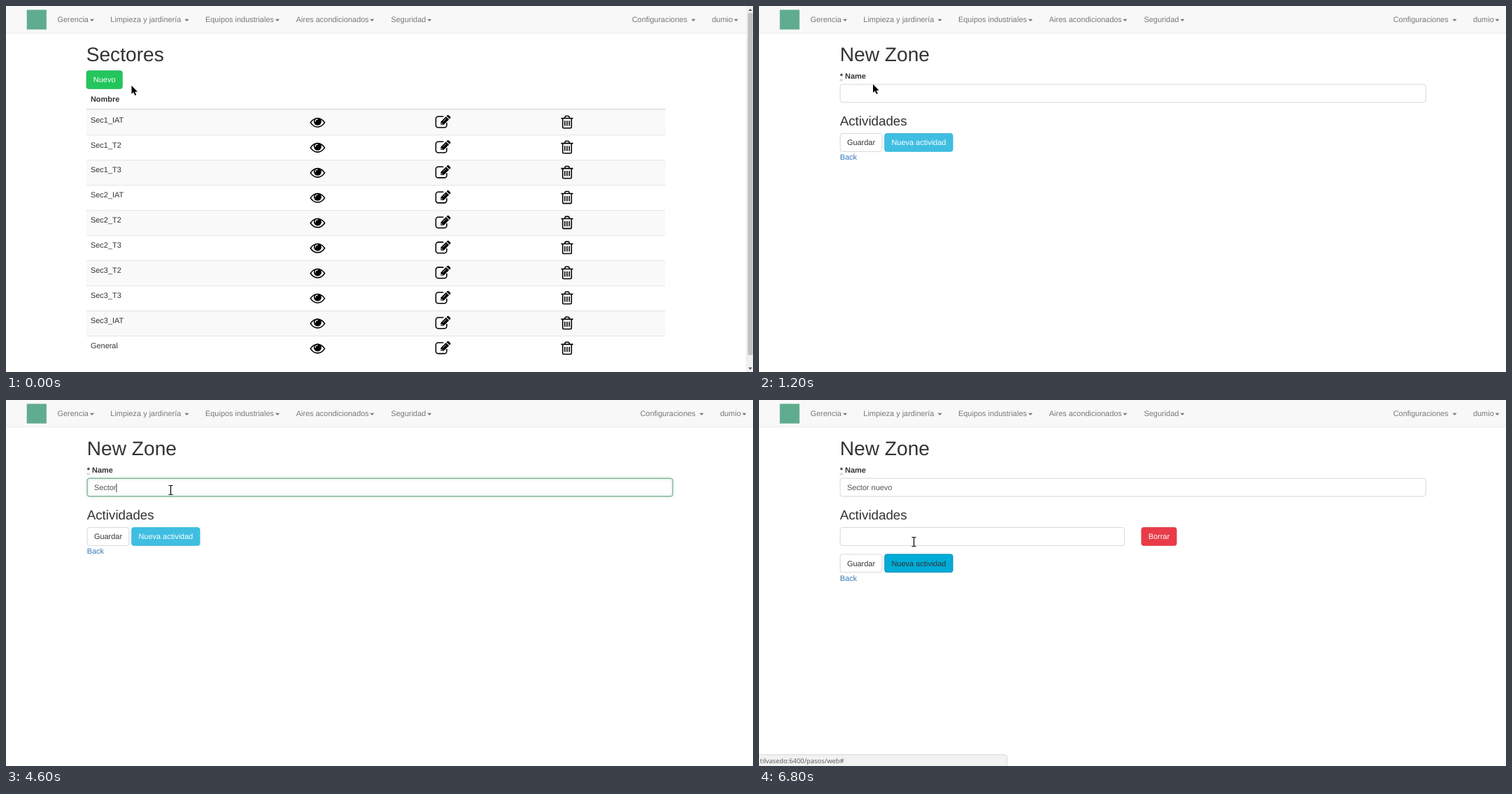
These frames come from a looping animation (1068x524 px, 8000 ms). An HTML page:

```html
<!DOCTYPE html>
<html lang="es">
<head>
<meta charset="utf-8">
<title>Sectores</title>
<style>
  html, body { margin: 0; width: 100%; height: 100%; overflow: hidden; background: #fff; }
  svg { display: block; width: 1068px; height: 524px; }
  text { font: 14px "Liberation Sans", Arial, sans-serif; fill: #333; text-rendering: geometricPrecision; white-space: pre; }
  .h1 { font-size: 36px; }
  .h3 { font-size: 24px; }
  .bold { font-weight: bold; }
  .nav text { fill: #777; }
  .nav path { fill: #777; }
  .light { fill: #fff; }
  .link { fill: #337ab7; }
  .typed { fill: #555; }
  .status text { font: 12px "Open Sans", "Noto Sans", sans-serif; fill: #555; }
  .green rect { fill: #22c65d; stroke: #1eb454; }
  .cyan rect { fill: #3fbee2; stroke: #30b5dc; }
  .red rect { fill: #e83c48; stroke: #e02d3a; }
  .plain rect { fill: #fff; stroke: #ccc; }
  .green text, .cyan text, .red text { fill: #fff; }
  .hover text { fill: #333; }
  .green.hover rect { fill: #04ad49; stroke: #078a3c; }
  .cyan.hover rect { fill: #00acd8; stroke: #0783a6; }
  #focus { fill: none; stroke: #4a9c6c; filter: drop-shadow(0 0 3px rgba(70, 165, 105, .7)); }
  #cursor path { fill: #000; stroke: #fff; stroke-width: .8; paint-order: stroke; }
</style>
</head>
<body>
<svg id="stage" viewBox="0 0 1366 670.2" preserveAspectRatio="none"></svg>
<script>
const stage = document.getElementById('stage');
const byId = id => document.getElementById(id);

// Layout is in 1366-wide page units; the cursor layer is in stage pixels.
const text = (x, y, s, cls = '') => `<text x="${x}" y="${y}" class="${cls}">${s}</text>`;
const box = (x, y, w, h, fill, more = '') =>
  `<rect x="${x}" y="${y}" width="${w}" height="${h}" fill="${fill}" ${more}/>`;
const framed = (x, y, w, h, more = '') =>
  box(x + .5, y + .5, w - 1, h - 1, '#fff', `rx="4" ${more}`);
const button = (x, y, w, label, cls, id = '') =>
  `<g class="${cls}" id="${id}">${framed(x, y, w, 34)}${text(x + 13, y + 22, label)}</g>`;
const menu = ([label, x, caret]) =>
  text(x, 30, label) + `<path d="M${caret} 24h8l-4 4z"/>`;

const navLeft = [
  ['Gerencia', 94, 153.3], ['Limpieza y jardinería', 191, 326.7],
  ['Equipos industriales', 364.5, 492.4], ['Aires acondicionados', 530.5, 665.4],
  ['Seguridad', 704, 770.2]
];
const navRight = [['Configuraciones', 1144.7, 1253], ['dumio', 1290.8, 1331]];

const nav = `<g class="nav">
  ${box(0, 0, 1366, 49, '#f8f8f8')}${box(0, 49, 1366, 1, '#e7e7e7')}
  ${box(38, 7, 36, 36, '#5fac8e')}
  ${navLeft.map(menu).join('')}
  <g id="navRight">${navRight.map(menu).join('')}</g></g>`;

const icons = `<defs><g id="icons">
  <g fill="none" stroke="#000" stroke-width="2">
    <path d="M556.8 23.5c3.6-5.4 8-8 13-8s9.400 2.600 13 8c-3.600 5.400-8 8-13 8s-9.400-2.600-13-8z"/>
    <path d="M800 12.500h-9.500a4.500 4.500 0 0 0-4.500 4.500v11a4.500 4.500 0 0 0 4.500 4.500h11a4.500 4.500 0 0 0 4.500-4.500v-4"/>
    <path d="M1015 15.500h22M1021.500 15l1-2.500q.4-1 1.500-1h4q1.100 0 1.500 1l1 2.500M1018 15v17q0 1.500 1.500 1.500h13q1.500 0 1.500-1.500v-17M1022 20v9.500M1026 20v9.500M1030 20v9.500"/>
  </g>
  <circle cx="569.8" cy="21.5" r="7"/>
  <path d="M565.6 21.500a4.200 4.200 0 0 1 4.200-4.200" fill="none" stroke="#fff" stroke-width="1.500" stroke-linecap="round"/>
  <path d="M795 27.500v-5.500l9.600-9.600 5.500 5.500-9.600 9.600zM805.600 11.400l1.200-1.200q1.500-1.500 3 0l2.500 2.500q1.500 1.500 0 3l-1.200 1.200z"/>
  <path d="M799 21.800l6-6M796.600 24v2h2" fill="none" stroke="#fff" stroke-width=".9"/>
</g></defs>`;

const names = ['Sec1_IAT', 'Sec1_T2', 'Sec1_T3', 'Sec2_IAT', 'Sec2_T2',
  'Sec2_T3', 'Sec3_T2', 'Sec3_T3', 'Sec3_IAT', 'General'];
const row = (name, i) => {
  const y = 190 + 46 * i;
  return (i % 2 ? '' : box(146.7, y, 1059, 46, '#f9f9f9'))
    + (i ? box(146.7, y, 1059, 1, '#ddd') : '')
    + text(154.7, y + 23, name) + `<use href="#icons" y="${y}"/>`;
};

const scrollbar = box(1353, 0, 13, 671, '#f0f0f0') + box(1356.5, 13, 9, 626, '#c1c1c1')
  + '<path d="M1357.500 9l3.500-4 3.500 4zM1357.500 662l3.500 4 3.500-4z" fill="#505050"/>';

const listPage = `<g id="listPage">
  ${text(146.7, 101.5, 'Sectores', 'h1')}
  ${button(146.7, 118, 66.5, 'Nuevo', 'green', 'create')}
  ${text(154.7, 175, 'Nombre', 'bold')}
  ${names.map(row).join('')}${box(146.7, 188, 1059, 2, '#ddd')}
  ${scrollbar}</g>`;

const formPage = `<g id="formPage">
  ${text(148, 101.5, 'New Zone', 'h1')}${text(148, 133, '* Name', 'bold')}
  <path d="M148 134.500h6M148 136.500h6" stroke="#777" stroke-dasharray="1"/>
  ${framed(148, 143, 1071.7, 34, 'stroke="#ccc"')}
  ${framed(148, 143, 1071.7, 34, 'id="focus"')}
  <text id="typed" class="typed" x="161" y="165"></text>
  ${box(0, 153, 1.2, 16, '#333', 'id="caret"')}
  ${text(148, 218.5, 'Actividades', 'h3')}
  <g id="activity">${framed(148, 233, 520.7, 34, 'stroke="#ccc"')}
    ${button(699, 233, 65, 'Borrar', 'red')}</g>
  <g id="actions">${button(148, 233, 77.4, 'Guardar', 'plain')}
    ${button(229.3, 233, 125.6, 'Nueva actividad', 'cyan', 'add')}
    ${text(148, 282, 'Back', 'link')}</g></g>`;

const status = `<g id="status" class="status">
  <path d="M-1 649.500h450q4.500 0 4.500 4.500v18h-455z" fill="#f2f2f2" stroke="#ccc"/>
  <text id="address" x="2" y="665.5"></text></g>`;

stage.innerHTML = icons + nav + listPage + formPage + status
  + '<g transform="scale(1.279)"><g id="cursor"><path/></g></g>';

const shapes = {
  arrow: 'M0 0v12l2.800-2.500 2 4.600 2-.9-2-4.400h3.700z',
  hand: 'M-1.200 1Q0-.6 1.200 1V5q1.500-.8 2.300.4 1.600-.6 2.200.6 1.900-.3 2 1.400V11q0 1.500-1 3v.8H-.5V14Q-3.500 10-4.200 8q0-1.600 1.400-1.200L-1.200 8z',
  beam: 'M-3-7h2.300l.7.500.7-.5H3v1H.6V6H3v1H.7L0 6.500-.7 7H-3V6h2.400V-6H-3z'
};
const moves = [
  [0, 'arrow', 179.5, 114], [200, 'arrow', 172, 112], [300, 'hand', 157.5, 109],
  [1200, 'arrow', 163, 112], [1300, 'arrow', 178, 117], [1400, 'beam', 195, 124],
  [1500, 'beam', 212, 131], [1600, 'beam', 224, 135], [1700, 'beam', 231.5, 137],
  [2000, 'beam', 235.5, 129], [6300, 'hand', 222, 187], [6800, 'beam', 221.5, 203]
];
const typing = [[0, ''], [4600, 'Sector'], [5000, 'Sector n'], [5400, 'Sector nuevo']];

const at = (keys, t) => keys.filter(k => k[0] <= t).pop();
const show = (id, on) => byId(id).setAttribute('opacity', +on);
const shift = (id, x, y) => byId(id).setAttribute('transform', `translate(${x} ${y})`);
// Fades advance in three 100 ms steps.
const fade = (t, start) => Math.max(0, Math.min(1, (Math.floor((t - start) / 100) + 1) / 3));

function render(t) {
  const onForm = t >= 1200, added = t >= 6800;
  show('listPage', !onForm);
  show('formPage', onForm);
  shift('navRight', onForm ? 15 : 0, 0);
  byId('create').classList.toggle('hover', t >= 300);
  byId('add').classList.toggle('hover', t >= 6300);

  const value = byId('typed');
  value.textContent = at(typing, t)[1];
  byId('caret').setAttribute('x', 161 + value.getComputedTextLength());
  show('caret', t >= 2200 && t < 6300);
  show('focus', added ? 0 : fade(t, 2200));
  show('activity', added);
  shift('actions', 0, added ? 49 : 0);

  show('status', added ? 1 : onForm ? 0 : fade(t, 500));
  byId('address').textContent = 'tilvasedo:6400/pasos/web' + (added ? '#' : '');

  const [, shape, x, y] = at(moves, t);
  byId('cursor').firstChild.setAttribute('d', shapes[shape]);
  shift('cursor', x, y);
}

function loop() {
  render(performance.now() % 8000);
  requestAnimationFrame(loop);
}
loop();
</script>
</body>
</html>
```
